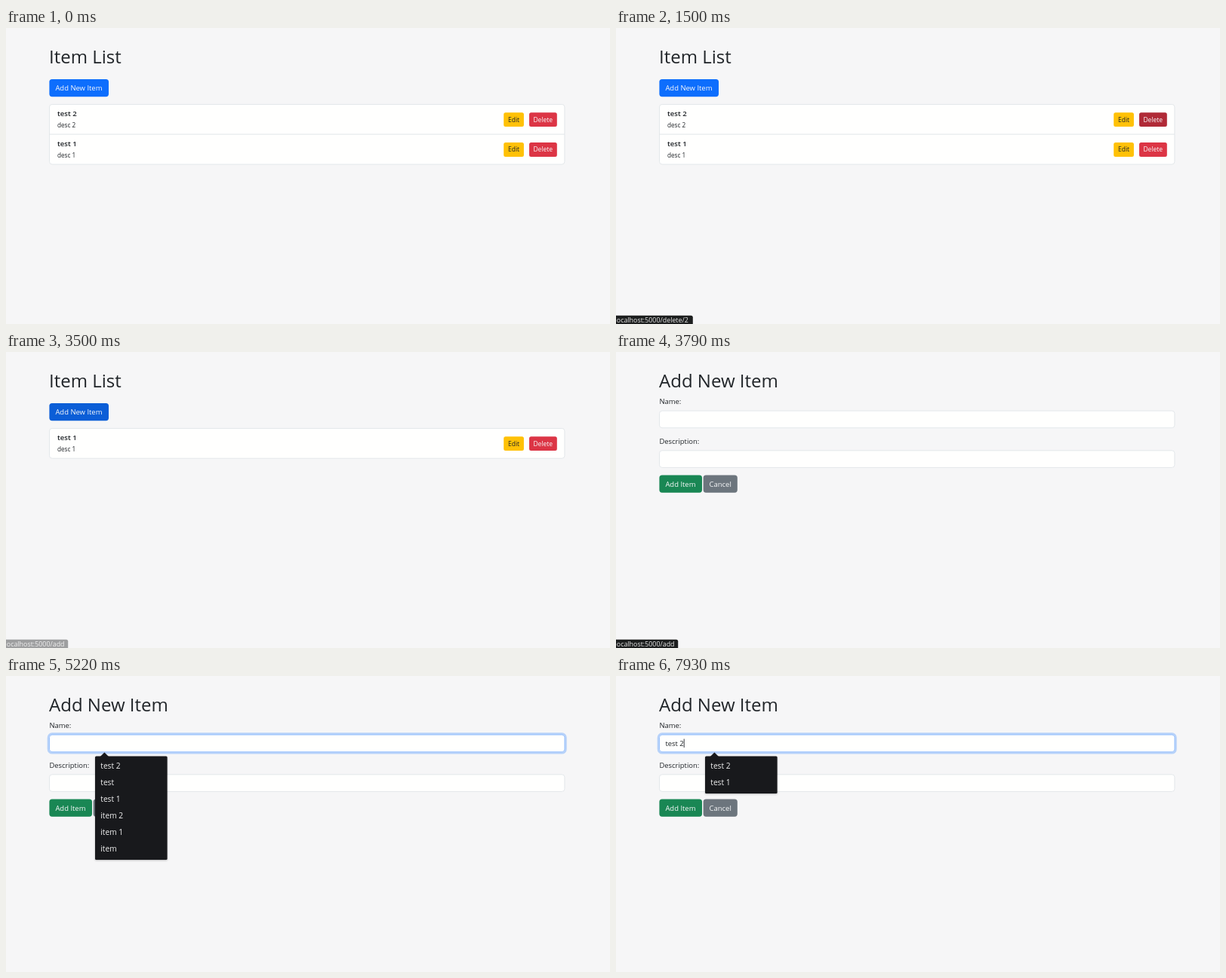
These frames come from a looping animation (800 px wide and 393 px high, 8000 ms). An HTML page:

```html
<!DOCTYPE html>
<html lang="en">
<head>
<meta charset="utf-8">
<title>Item List</title>
<style>
  html, body { margin: 0; width: 100%; height: 100%; overflow: hidden; background: #f6f6f7; }
  svg { display: block; width: 800px; height: 393px; }
  text { font: 9.45px "Open Sans", "Noto Sans", sans-serif; fill: #212529; white-space: pre; }
  .title { font-size: 24px; font-weight: 500; }
  .name { font-size: 9.6px; font-weight: 600; }
  .desc { font-size: 8.2px; }
  .small { font-size: 8.5px; }
  .light { fill: #f8f9fa; }
  .field { fill: #fffffe; stroke: #dee2e6; stroke-width: .8; }
  .focus { stroke: #86b7fe; }
  .ring { fill: none; stroke: #0d6efd; stroke-opacity: .27; stroke-width: 2.6; }
  .dark { fill: #18191c; }
  #menu { filter: drop-shadow(0 1px 1px rgba(0, 0, 0, .25)); }
  #menu text { font-size: 10.2px; fill: #f1f1f1; }
  #status rect { fill: #1d1f1f; }
  #status text { font-size: 8.9px; fill: #e8e8e8; }
</style>
</head>
<body>
<svg viewBox="0 0 800 393">
  <defs>
    <g id="edit">
      <rect x="659.2" y="112.2" width="26.7" height="18.8" rx="2.5" fill="#ffc107"/>
      <text class="small" x="665" y="124.6">Edit</text>
    </g>
  </defs>

  <g id="list">
    <text class="title" x="57" y="47">Item List</text>
    <rect id="add" x="57.4" y="68" width="78.6" height="23.2" rx="3.6"/>
    <text class="light" x="65.4" y="83">Add New Item</text>
    <rect id="card" class="field" x="57.5" y="101.4" width="682.4" rx="3.6"/>

    <g id="row2" transform="translate(0 39.9)">
      <path d="M57.5 101.2H739.9" stroke="#dee2e6" stroke-width=".9"/>
      <text class="name" x="68" y="117.4">test 1</text>
      <text class="desc" x="68" y="132">desc 1</text>
      <use href="#edit"/>
      <rect x="693" y="112.2" width="36.8" height="18.8" rx="2.5" fill="#dc3545"/>
      <text class="small light" x="698.4" y="124.6">Delete</text>
    </g>

    <text id="topName" class="name" x="68" y="117.4"></text>
    <text id="topDesc" class="desc" x="68" y="132"></text>
    <use href="#edit"/>
    <rect id="del" x="693" y="112.2" width="36.8" height="18.8" rx="2.5"/>
    <text class="small light" x="698.4" y="124.6">Delete</text>
  </g>

  <g id="form">
    <text class="title" x="57" y="47">Add New Item</text>
    <text x="57.4" y="69">Name:</text>
    <rect id="ring" class="ring" x="56" y="76.6" width="685.4" height="25.6" rx="5"/>
    <rect id="field" class="field" x="57.5" y="78.1" width="682.4" height="22.6" rx="3.6"/>
    <text id="typed" x="65.4" y="92.8"></text>
    <rect id="caret" y="83.5" width=".9" height="11.5" fill="#212529"/>
    <text x="57.4" y="121.6">Description:</text>
    <rect class="field" x="57.5" y="130.8" width="682.4" height="22.6" rx="3.6"/>
    <rect x="57.4" y="163.5" width="56.6" height="23.2" rx="3.6" fill="#198754"/>
    <text class="light" x="65.4" y="178.5">Add Item</text>
    <rect x="115.6" y="163.5" width="45.2" height="23.2" rx="3.6" fill="#6c757d"/>
    <text class="light" x="123.6" y="178.5">Cancel</text>
    <g id="menu">
      <path class="dark" d="M124.8 107L130.4 101.6L136 107Z"/>
      <rect id="menuBox" class="dark" x="118" y="106.5" width="95.6" rx="1.5"/>
      <g id="options"></g>
    </g>
  </g>

  <g id="status">
    <rect id="bubble" x="-5" y="381.8" height="16" rx="2.5"/>
    <text id="link" x="-1.4" y="391.4"></text>
  </g>
</svg>
<script>
const LOOP = 8000;
const RED = { rest: '#dc3545', mid: '#cc3140', hover: '#bb2d3b', down: '#b02a37' };
const BLUE = { rest: '#0d6efd', mid: '#0c66ea', hover: '#0b5ed7', down: '#0a58ca' };
const MENU = {
  none: [],
  all: ['test 2', 'test', 'test 1', 'item 2', 'item 1', 'item'],
  t: ['test 2', 'test', 'test 1'],
  space: ['test 2', 'test 1']
};

// Each entry changes part of the state from its time onward.
const timeline = [
  [0, { page: 'list', top: 2, del: 'rest', add: 'rest', link: 'delete/2', show: 0,
        typed: '', caret: 0, focus: 0, menu: 'none' }],
  // delete the first item
  [500, { del: 'mid' }],
  [650, { del: 'hover', show: .3 }],
  [790, { show: .6 }],
  [930, { show: .9 }],
  [1080, { show: 1 }],
  [1500, { del: 'down' }],
  [1650, { top: 1, del: 'hover' }],
  [1790, { link: 'delete/3' }],
  [2500, { del: 'mid' }],
  [2650, { del: 'rest', show: .8 }],
  [2790, { show: .4 }],
  [2930, { show: 0 }],
  // open the form
  [3360, { add: 'mid', link: 'add' }],
  [3500, { add: 'hover', show: .4 }],
  [3650, { add: 'down', show: .9 }],
  [3790, { page: 'form', show: 1 }],
  [3930, { show: .8 }],
  [4080, { show: .4 }],
  [4220, { show: 0 }],
  // type the name; the menu lags one key behind
  [4650, { caret: 1 }],
  [4790, { focus: 1, menu: 'all' }],
  [5220, { caret: 0 }],
  [5790, { caret: 1 }],
  [6360, { typed: 't' }],
  [6500, { typed: 'te', menu: 't' }],
  [6790, { typed: 'tes' }],
  [6930, { typed: 'test' }],
  [7500, { caret: 0 }],
  [7790, { typed: 'test ', caret: 1 }],
  [7930, { typed: 'test 2', menu: 'space' }]
];

const $ = id => document.getElementById(id);
const set = (id, attr, value) => $(id).setAttribute(attr, value);
const visible = (id, on) => { $(id).style.display = on ? '' : 'none'; };

const options = MENU.all.map((_, i) => {
  const item = document.createElementNS('http://www.w3.org/2000/svg', 'text');
  item.setAttribute('x', 125.3);
  item.setAttribute('y', 123.4 + 22 * i);
  return $('options').appendChild(item);
});

function stateAt(time) {
  return Object.assign({}, ...timeline.filter(([at]) => at <= time).map(([, change]) => change));
}

function draw(s) {
  visible('list', s.page === 'list');
  visible('form', s.page === 'form');

  $('topName').textContent = 'test ' + s.top;
  $('topDesc').textContent = 'desc ' + s.top;
  visible('row2', s.top === 2);
  set('card', 'height', s.top === 2 ? 79.6 : 39.8);
  set('del', 'fill', RED[s.del]);
  set('add', 'fill', BLUE[s.add]);

  $('link').textContent = 'localhost:5000/' + s.link;
  set('bubble', 'width', s.link === 'add' ? 87.2 : 106.8);
  set('status', 'opacity', s.show);

  $('typed').textContent = s.typed;
  const width = s.typed ? $('typed').getComputedTextLength() : 0;
  set('caret', 'x', 65.4 + width);
  visible('caret', s.caret);
  visible('ring', s.focus);
  $('field').classList.toggle('focus', !!s.focus);

  const items = MENU[s.menu];
  visible('menu', items.length);
  set('menuBox', 'height', 22 * items.length + 5.4);
  options.forEach((item, i) => { item.textContent = items[i] || ''; });
}

const start = performance.now();
function tick() {
  draw(stateAt((performance.now() - start) % LOOP));
  requestAnimationFrame(tick);
}
tick();
</script>
</body>
</html>
```
